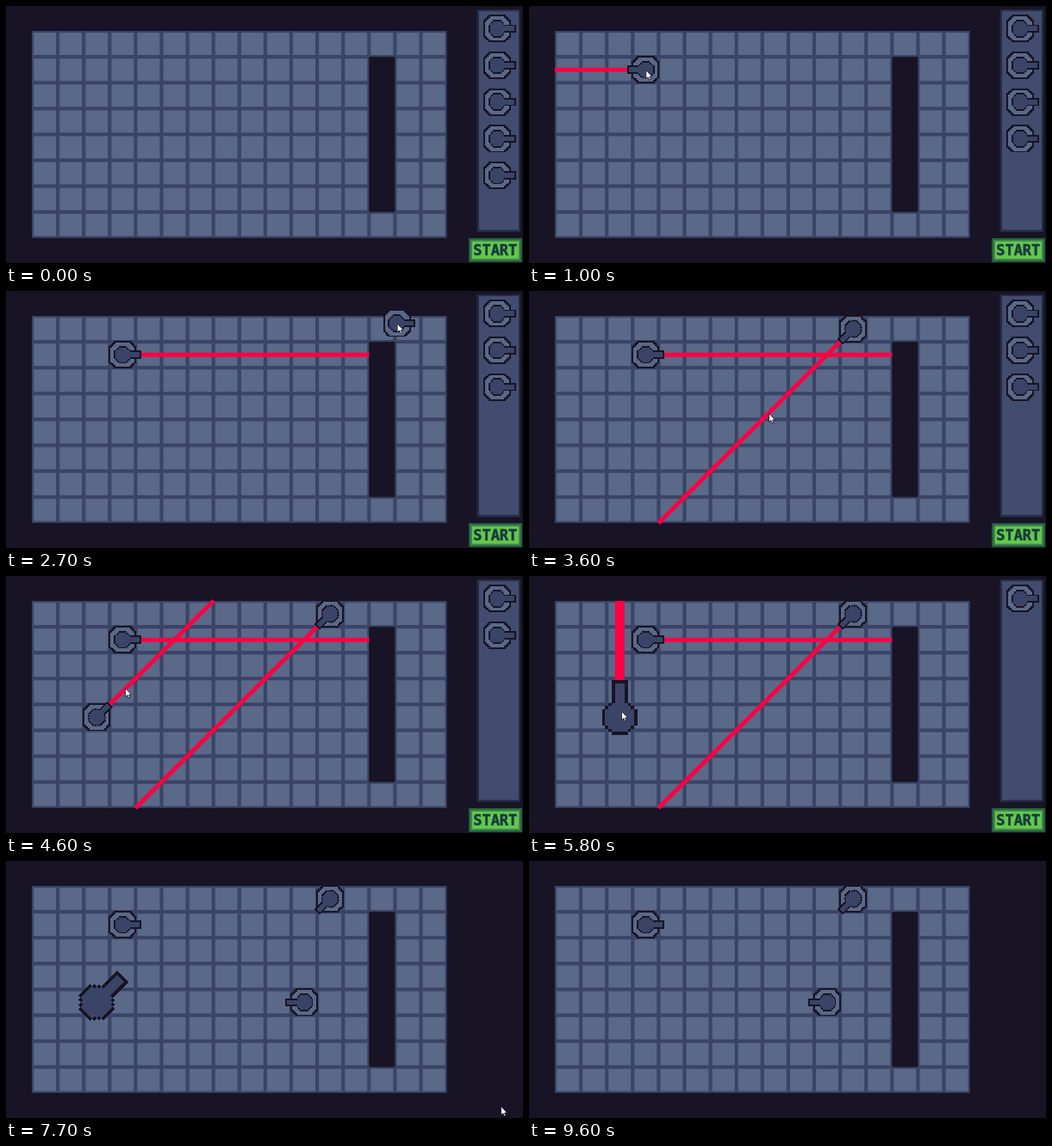
An HTML page with a canvas that plays this animation: 600 px wide and 299 px high, repeating every 9700 ms.

```html
<!DOCTYPE html>
<html lang="en">
<head>
<meta charset="utf-8">
<title>Laser turrets</title>
<style>
html, body { margin: 0; width: 100%; height: 100%; overflow: hidden; background: #181425; }
#stage { position: relative; width: 600px; height: 299px; overflow: hidden; }
canvas, #cursor { position: absolute; left: 0; top: 0; }
#start {
  position: absolute; left: 536.5px; top: 270px; width: 62.5px; height: 28px; box-sizing: border-box;
  border: 2px solid #265c42; background: #63c74d; box-shadow: inset 0 0 0 2px #3e8948;
  color: #193c3e; font: bold 17px/25px "DejaVu Sans Mono", monospace; text-align: center;
  -webkit-text-stroke: .5px #193c3e;
}
</style>
</head>
<body>
<div id="stage">
  <canvas id="view" width="600" height="299"></canvas>
  <div id="start">START</div>
  <svg id="cursor" width="9" height="14" viewBox="0 0 9 14">
    <path d="M.5 .5V10.5L2.8 8.5L4.4 12L6 11.3L4.5 8H7.5Z" fill="#fff" stroke="#181425" stroke-width=".8"/>
  </svg>
</div>
<script>
const LOOP = 9700, STEP = 100, PLAY = 7700, FIRE = 8200, DEATH = 9500;
const TURN = 250, SPEED = 1.47, MUZZLE = 37;
const DARK = '#181425', NAVY = '#262b44', LINE = '#3a4466', PANEL = '#424c6e', TILE = '#5a6988', RED = '#ff0044';
const CELL = 30.1, PX = CELL / 16, COLS = 16, ROWS = 8;
const BOARD = { x: 30, y: 29, w: COLS * CELL, h: ROWS * CELL };
const HOLE = { x: BOARD.x + 13 * CELL, y: BOARD.y + CELL, w: CELL, h: 6 * CELL };
const SLOT = { x: 570, y: 26.3, gap: 42.7 };

const ctx = document.getElementById('view').getContext('2d');
const startBtn = document.getElementById('start');
const cursor = document.getElementById('cursor');

// Directions are eighths of a turn, clockwise from right; look is the cursor's aiming point.
const turrets = [
  { pick: 400, drop: 1000, col: 3, row: 1, from: 4, to: 0, aimed: 1800, look: [292, 128], reload: 600 },
  { pick: 2300, drop: 3000, col: 11, row: 0, from: 2, to: 3, aimed: 3600, look: [278, 142], reload: 1800 },
  { pick: 4000, drop: 4400, col: 2, row: 4, from: 7, to: 7, aimed: 4600, look: [138, 130] },
  { pick: 5100, drop: 5500, col: 2, row: 4, from: 5, to: 7, aimed: 5800, look: [107, 157], big: true, reload: 1800 },
  { pick: 6400, drop: 6900, col: 10, row: 4, from: 4, to: 4, aimed: 7100, look: [300, 164], reload: 600 }
];
const cannon = turrets.find(u => u.big);
for (const u of turrets) {
  u.x = BOARD.x + (u.col + .5) * CELL;
  u.y = BOARD.y + (u.row + .5) * CELL;
  u.end = u === cannon ? DEATH : u.col === cannon.col && u.row === cannon.row ? cannon.drop : LOOP;
}

const path = [
  [STEP, 578, 288],
  ...turrets.flatMap(u => [[u.pick, SLOT.x + 3, SLOT.y + 1], [u.drop, u.x, u.y], [u.aimed, ...u.look]]),
  [PLAY, 574, 285]
];

function cursorAt(t) {
  if (t >= DEATH - STEP) return [577, 297];
  if (t < STEP || t > PLAY) return null;
  const i = Math.max(1, path.findIndex(p => p[0] >= t));
  const [t0, x0, y0] = path[i - 1], [t1, x1, y1] = path[i];
  const s = (t - t0) / (t1 - t0), k = s * s * (3 - 2 * s);
  return [x0 + (x1 - x0) * k, y0 + (y1 - y0) * k];
}

// Pixel sprite on a 25 x 25 grid, coordinates counted from the middle pixel.
function sprite(colorAt) {
  const c = document.createElement('canvas');
  c.width = c.height = 25;
  const g = c.getContext('2d');
  for (let x = -12; x <= 12; x++) for (let y = -12; y <= 12; y++) {
    const color = colorAt(x, y);
    if (!color) continue;
    g.fillStyle = color;
    g.fillRect(x + 12, y + 12, 1, 1);
  }
  return c;
}

const chamfer = (x, y, r, sum) =>
  Math.max(Math.abs(x), Math.abs(y)) <= r && Math.abs(x) + Math.abs(y) <= sum;
const gunShape = (x, y, r, w, len) =>
  chamfer(x, y, r, r + 2) || (x >= 0 && x <= len && Math.abs(y) <= w);

const base = sprite((x, y) => chamfer(x, y, 7, 11) ? TILE : chamfer(x, y, 8, 13) ? DARK : null);
const gun = sprite((x, y) => gunShape(x, y, 4, 1, 10) ? LINE : gunShape(x, y, 5, 2, 11) ? DARK : null);

const angle = dir => dir * Math.PI / 4;

function drawTurret(x, y, dir, big) {
  const s = 25 * PX;
  ctx.save();
  ctx.translate(x, y);
  if (big) ctx.scale(2, 2);
  else ctx.drawImage(base, -s / 2, -s / 2, s, s);
  ctx.rotate(angle(dir));
  ctx.drawImage(gun, -s / 2, -s / 2, s, s);
  ctx.restore();
}

function rect(r, color) {
  ctx.fillStyle = color;
  ctx.fillRect(r.x, r.y, r.w, r.h);
}

function drawBoard() {
  rect({ x: 0, y: 0, w: 600, h: 299 }, DARK);
  rect(BOARD, LINE);
  for (let c = 0; c < COLS; c++) for (let r = 0; r < ROWS; r++)
    rect({ x: BOARD.x + c * CELL + 2.1, y: BOARD.y + r * CELL + 2.1, w: CELL - 4.2, h: CELL - 4.2 }, TILE);
  rect(HOLE, DARK);
}

function drawPanel(t) {
  rect({ x: 546.5, y: 4, w: 50.5, h: 259 }, NAVY);
  rect({ x: 549, y: 6, w: 46, h: 254.5 }, PANEL);
  turrets.filter(u => t < u.pick).forEach((u, i) => drawTurret(SLOT.x, SLOT.y + i * SLOT.gap, 0));
}

const alive = (u, t) => t >= u.drop && t < u.end;

function dirAt(u, t) {
  const turns = Math.min(Math.floor((t - u.drop) / TURN), Math.abs(u.to - u.from));
  return u.from + Math.sign(u.to - u.from) * turns;
}

const inside = (r, x, y) => x >= r.x && x <= r.x + r.w && y >= r.y && y <= r.y + r.h;

function blocked(u, x, y, t) {
  return !inside(BOARD, x, y) || inside(HOLE, x, y) ||
    (u !== cannon && alive(cannon, t) && Math.hypot(x - cannon.x, y - cannon.y) < 20);
}

function along(u, t, d) {
  const a = angle(dirAt(u, t));
  return [u.x + Math.cos(a) * d, u.y + Math.sin(a) * d];
}

function reach(u, t) {
  let d = 0;
  while (!blocked(u, ...along(u, t, d), t)) d += .5;
  return d;
}

function drawLaser(u, t) {
  ctx.strokeStyle = RED;
  ctx.lineWidth = u.big ? 11 : 5;
  ctx.beginPath();
  ctx.moveTo(u.x, u.y);
  ctx.lineTo(...along(u, t, reach(u, t)));
  ctx.stroke();
}

function drawShot(u, t) {
  if (t < FIRE) return;
  const d = MUZZLE + (t - FIRE) % u.reload * SPEED;
  if (d > reach(u, t)) return;
  const [x, y] = along(u, t, d), s = u.big ? 13 : 7;
  rect({ x: x - s / 2, y: y - s / 2, w: s, h: s }, RED);
}

function render(t) {
  const planning = t < PLAY;
  const live = turrets.filter(u => alive(u, t));
  ctx.imageSmoothingEnabled = false;
  drawBoard();
  live.forEach(u => planning ? drawLaser(u, t) : drawShot(u, t));
  live.forEach(u => drawTurret(u.x, u.y, dirAt(u, t), u.big));
  if (planning) drawPanel(t);
  startBtn.style.display = planning ? '' : 'none';

  const p = cursorAt(t);
  cursor.style.display = p ? '' : 'none';
  if (!p) return;
  if (turrets.some(u => t >= u.pick && t < u.drop)) drawTurret(...p, 0);
  cursor.style.transform = `translate(${p[0]}px, ${p[1]}px)`;
}

const began = performance.now();
function frame() {
  const t = (performance.now() - began) % LOOP;
  render(Math.floor(t / STEP) * STEP);
  requestAnimationFrame(frame);
}
frame();
</script>
</body>
</html>
```
